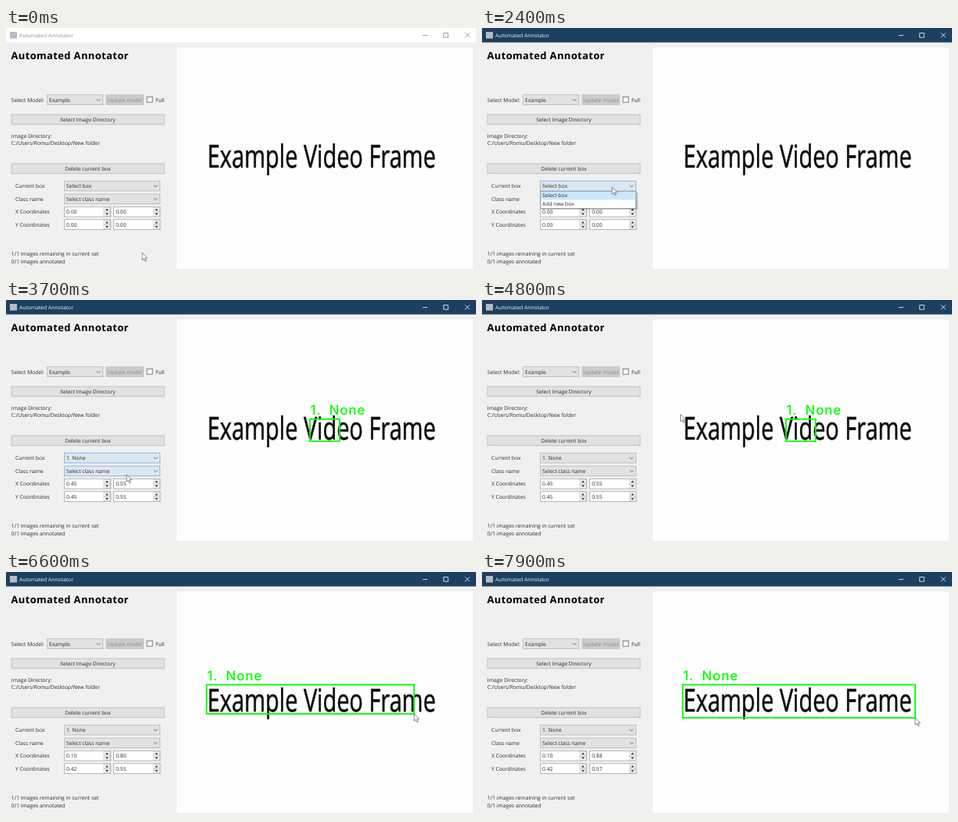
Recreate the animation shown at these times as an HTML page. Size 600 by 313 pixels, loop 8 s.

```html
<!DOCTYPE html>
<html lang="en">
<head>
<meta charset="utf-8">
<title>Automated Annotator</title>
<style>
html, body { margin: 0; width: 100%; height: 100%; overflow: hidden; background: #f0f0f0; }
svg { display: block; width: 600px; height: 313px; }
text { font: 6.75px "Open Sans", "Noto Sans", sans-serif; fill: #2a2a2a; white-space: pre; text-rendering: geometricPrecision; }
.title { font-size: 12.9px; font-weight: 700; fill: #000; letter-spacing: .4px; }
.frame { font-size: 40.5px; fill: #0c0c0c; stroke: #0c0c0c; stroke-width: .6px; }
.tag { font: 500 17px Inter, "Liberation Sans", sans-serif; fill: #0f0; letter-spacing: .8px; word-spacing: 5px; }
</style>
</head>
<body>
<svg viewBox="0 0 600 313"><g id="still"></g><g id="live"></g></svg>
<script>
const LOOP = 8000, STEP = 100;
const VIEW = { x: 218, y: 25, w: 378, h: 284 };
const CLICK_OPEN = 2000, CLICK_ADD = 2900, PRESS = 5300;
const START = [256.2, 144.6];

// Pointer stops: time, x, y
const PATH = [
  [0, 174, 288.5], [500, 174, 288.5], [1500, 165, 207.7], [1900, 166, 204], [2400, 166, 204],
  [2800, 157, 225], [3700, 154, 224], [3900, 157, 222], [4900, 256.2, 144.6],
  [5300, 256.2, 144.6], [5900, 313, 164.5], [6600, 521, 182], [7300, 553, 187], [8000, 553, 187]
];

const rect = (x, y, w, h, fill, stroke = 'none', sw = .7) =>
  `<rect x="${x}" y="${y}" width="${w}" height="${h}" fill="${fill}" stroke="${stroke}" stroke-width="${sw}"/>`;
const line = (d, stroke, sw = .8, fill = 'none') =>
  `<path d="${d}" fill="${fill}" stroke="${stroke}" stroke-width="${sw}"/>`;
const text = (x, y, s, attrs = '') => `<text x="${x}" y="${y}" ${attrs}>${s}</text>`;

function button(x, y, w, label, off) {
  return rect(x, y, w, 12.8, off ? '#ccc' : '#e1e1e1', off ? '#bfbfbf' : '#b0b0b0') +
    text(x + w / 2, y + 8.9, label, `text-anchor="middle"${off ? ' style="fill:#888"' : ''}`);
}

function combo(x, y, w, label, hot) {
  return rect(x, y, w, 12.8, hot ? '#dde7f1' : '#e2e2e2', hot ? '#6ba3d6' : '#b0b0b0') +
    text(x + 2.6, y + 8.9, label) +
    line(`M${x + w - 8} ${y + 5.3}l2.4 2.4l2.4 -2.4`, '#555');
}

function spin(x, y, value) {
  const bx = x + 50.5;
  return rect(x, y, 59.3, 12.8, '#fff', '#9c9c9c') +
    rect(bx, y + .8, 8, 5.5, '#f0f0f0', '#b8b8b8', .5) +
    rect(bx, y + 6.6, 8, 5.5, '#f0f0f0', '#b8b8b8', .5) +
    line(`M${bx + 2} ${y + 4.7}h4l-2 -2.4zM${bx + 2} ${y + 8.3}h4l-2 2.4z`, 'none', 0, '#333') +
    text(x + 2.6, y + 8.8, (Math.floor(value * 100 + 1e-6) / 100).toFixed(2));
}

function titleBar(active) {
  const ink = active ? '#fff' : '#858585';
  return rect(0, 0, 600, 18.5, active ? '#1d3f60' : '#fff') +
    rect(5, 5, 9, 8.5, '#b4bec6') +
    text(17, 11.8, 'Automated Annotator', `style="fill:${active ? '#f2f5f8' : '#929292'}"`) +
    line('M532 9.5h6M558.7 6.5h5.6v5.6h-5.6zM586 6.3l6 6M592 6.3l-6 6', ink);
}

function dropdown() {
  return rect(76, 211, 123, 22, '#00000030') + rect(74.5, 209.4, 122, 22, '#fff', '#777') +
    rect(75, 209.8, 121.2, 10.6, '#cbe7f8') +
    text(77, 217.4, 'Select box') + text(77, 228, 'Add new box');
}

function pointer(t) {
  const i = PATH.findIndex(p => p[0] > t), [t0, x0, y0] = PATH[i - 1], [t1, x1, y1] = PATH[i];
  const u = (t - t0) / (t1 - t0), k = u * u * (3 - 2 * u);
  return [x0 + (x1 - x0) * k, y0 + (y1 - y0) * k];
}

const toUnit = (x, y) => [(x - VIEW.x) / VIEW.w, (y - VIEW.y) / VIEW.h];

function boxAt(t, tip) {
  if (t < CLICK_ADD) return [0, 0, 0, 0];
  if (t < PRESS) return [.45, .45, .55, .55];
  return [...toUnit(...START), ...toUnit(...tip)];
}

function drawBox([x1, y1, x2, y2]) {
  const x = VIEW.x + x1 * VIEW.w, y = VIEW.y + y1 * VIEW.h;
  return rect(x, y, (x2 - x1) * VIEW.w, (y2 - y1) * VIEW.h, 'none', '#0f0', 1.8) +
    text(x + .5, y - 5.5, '1. None', 'class="tag"');
}

const arrow = ([x, y]) =>
  line(`M${x} ${y}v9.3l2.1 -2l1.5 3.4l1.5 -.7l-1.5 -3.2h2.9z`, '#555', .7, '#fff');

function draw(t) {
  const tip = pointer(t), box = boxAt(t, tip), added = t >= CLICK_ADD;
  const boxHot = t >= 1600 && t < 4000;
  const classHot = (t >= 1300 && t < 1600) || (added && t < 4000);
  return titleBar(t >= CLICK_OPEN) +
    combo(74.4, 196.2, 122.2, added ? '1. None' : 'Select box', boxHot) +
    combo(74.4, 213, 122.2, 'Select class name', classHot) +
    spin(74.4, 229.3, box[0]) + spin(137.6, 229.3, box[2]) +
    spin(74.4, 245.8, box[1]) + spin(137.6, 245.8, box[3]) +
    (t >= CLICK_OPEN && !added ? dropdown() : '') +
    (added ? drawBox(box) : '') + arrow(tip);
}

still.innerHTML = rect(0, 0, 600, 313, '#f0f0f0') +
  rect(VIEW.x, VIEW.y, VIEW.w, VIEW.h, '#fefefe') +
  text(0, 0, 'Example Video Frame', 'class="frame" transform="translate(256.9 178.9) scale(.714 1)"') +
  text(6.5, 39.8, 'Automated Annotator', 'class="title"') +
  text(6.8, 94.6, 'Select Model:') + combo(52.3, 85.7, 71.5, 'Example') +
  button(127.8, 85.7, 47.8, 'Update model', true) +
  rect(180, 88.2, 7, 7, '#fff', '#444') + text(191, 94.6, 'Full') +
  button(7, 111, 195, 'Select Image Directory') +
  text(6.8, 141, 'Image Directory:') + text(6.8, 150.4, 'C:/Users/Romu/Desktop/New folder') +
  button(7, 174, 195, 'Delete current box') +
  ['Current box', 'Class name', 'X Coordinates', 'Y Coordinates']
    .map((s, i) => text(12, 205.2 + i * 16.5, s)).join('') +
  text(6.8, 292.4, '1/1 images remaining in current set') +
  text(6.8, 301.6, '0/1 images annotated');

let shown = -1;
function tick() {
  const t = Math.floor(performance.now() % LOOP / STEP) * STEP;
  if (t !== shown) live.innerHTML = draw(shown = t);
  requestAnimationFrame(tick);
}
tick();
</script>
</body>
</html>
```
